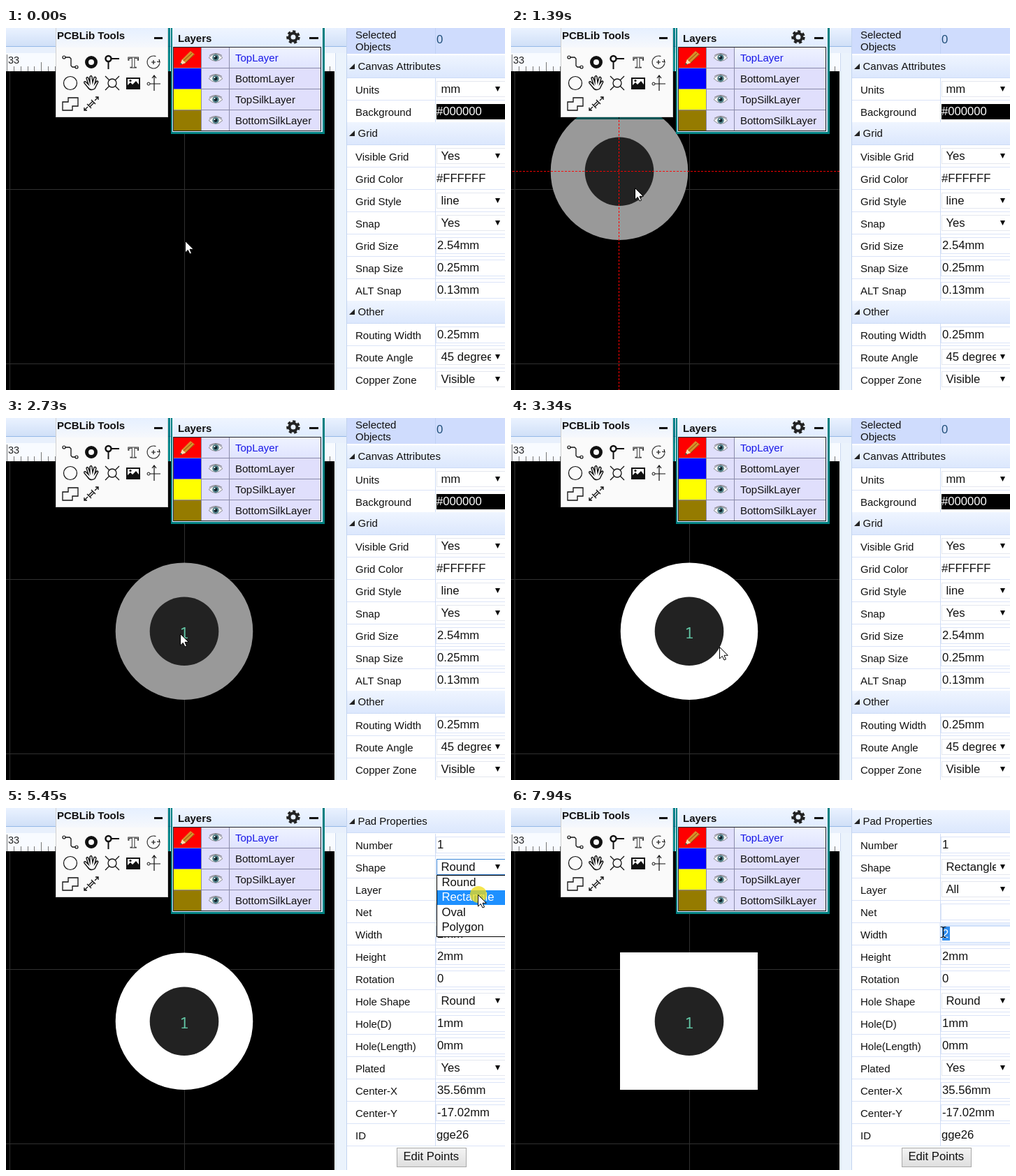
Animation, 714 px wide and 519 px high, one loop 8 s. Source, as an HTML page with a canvas:

```html
<!DOCTYPE html>
<html lang="en">
<head>
<meta charset="utf-8">
<title>Pad editing</title>
<style>
html, body { margin: 0; width: 100%; height: 100%; overflow: hidden; background: #000; }
canvas { display: block; }
</style>
</head>
<body>
<canvas id="stage" width="714" height="519"></canvas>
<script>
const ctx = document.getElementById('stage').getContext('2d');
const LOOP = 8000, TICK = 78.76;
const SANS = '"Liberation Sans", Arial, sans-serif';
const LABEL = `15px ${SANS}`, BOLD = `bold 15px ${SANS}`, VALUE = `16.67px ${SANS}`;

// Cursor track: time, x, y
const track = [
  [300, 257, 305], [380, 245, 282], [930, 118, 47], [1000, 118, 47], [1160, 140, 130],
  [1400, 177, 228], [1710, 253, 325], [1955, 253, 325], [2180, 251, 309], [2569, 251, 309],
  [2570, 238, 298], [2729, 238, 298], [2730, 250, 309], [2830, 250, 309], [3040, 303, 329],
  [3180, 303, 329], [3190, 299, 328], [3330, 299, 328], [3420, 291, 328], [3690, 291, 328],
  [4150, 668, 93], [4250, 668, 93], [4400, 674, 80], [4880, 674, 80], [5280, 676, 124],
  [7260, 676, 124], [7480, 634, 179], [7610, 634, 179], [7630, 633, 179], [7770, 633, 179],
  [7940, 618, 178]
];

const generalRows = [
  [55, 'Canvas Attributes', 'group'], [88, 'Units', 'select', 'mm'],
  [120, 'Background', 'dark', '#000000'], [151, 'Grid', 'group'],
  [184, 'Visible Grid', 'select', 'Yes'], [216, 'Grid Color', 'plain', '#FFFFFF'],
  [248, 'Grid Style', 'select', 'line'], [280, 'Snap', 'select', 'Yes'],
  [312, 'Grid Size', 'input', '2.54mm'], [344, 'Snap Size', 'input', '0.25mm'],
  [376, 'ALT Snap', 'input', '0.13mm'], [407, 'Other', 'group'],
  [440, 'Routing Width', 'input', '0.25mm'], [472, 'Route Angle', 'select', '45 degree'],
  [504, 'Copper Zone', 'select', 'Visible']
];

const padRows = (shape, width) => [
  ['Number', 'input', '1'], ['Shape', 'select', shape], ['Layer', 'select', 'All'],
  ['Net', 'input', ''], ['Width', 'input', width], ['Height', 'input', '2mm'],
  ['Rotation', 'input', '0'], ['Hole Shape', 'select', 'Round'], ['Hole(D)', 'input', '1mm'],
  ['Hole(Length)', 'input', '0mm'], ['Plated', 'select', 'Yes'],
  ['Center-X', 'input', '35.56mm'], ['Center-Y', 'input', '-17.02mm'], ['ID', 'plain', 'gge26']
].map((row, i) => [53 + 32 * i, ...row]);

function rect(x, y, w, h, color) {
  ctx.fillStyle = color;
  ctx.fillRect(x, y, w, h);
}
function frame(x, y, w, h, color) {
  ctx.strokeStyle = color;
  ctx.lineWidth = 1;
  ctx.strokeRect(x + .5, y + .5, w - 1, h - 1);
}
function text(str, x, y, font = LABEL, color = '#111') {
  ctx.font = font;
  ctx.fillStyle = color;
  ctx.fillText(str, x, y);
}
function disc(x, y, r, color) {
  ctx.fillStyle = color;
  ctx.beginPath();
  ctx.arc(x, y, r, 0, 7);
  ctx.fill();
}
function ring(x, y, r, width, color = '#111') {
  ctx.strokeStyle = color;
  ctx.lineWidth = width;
  ctx.beginPath();
  ctx.arc(x, y, r, 0, 7);
  ctx.stroke();
}
function line(d, width = 1.3, color = '#111') {
  ctx.strokeStyle = color;
  ctx.lineWidth = width;
  ctx.stroke(new Path2D(d));
}
function fill(d, color) {
  ctx.fillStyle = color;
  ctx.fill(new Path2D(d));
}
function shade(y, h, top, bottom) {
  const g = ctx.createLinearGradient(0, y, 0, y + h);
  g.addColorStop(0, top);
  g.addColorStop(1, bottom);
  return g;
}

function cursorAt(t) {
  const time = 300 + Math.floor((t - 300) / TICK + .2) * TICK;
  const i = track.findIndex(key => key[0] > time);
  if (i === 0) return track[0].slice(1);
  if (i < 0) return track[track.length - 1].slice(1);
  const [t0, x0, y0] = track[i - 1], [t1, x1, y1] = track[i];
  const p = (time - t0) / (t1 - t0);
  return [x0 + (x1 - x0) * p, y0 + (y1 - y0) * p].map(Math.round);
}
const snap = (v, origin) => Math.round((v - origin) / 25) * 25 + origin;

function drawBoard(t) {
  rect(0, 62, 470, 457, '#000');
  for (const x of [5, 255]) rect(x, 62, 1, 457, '#303030');
  for (const y of [231, 481]) rect(0, y, 470, 1, '#303030');
  if (t < 1080) return;

  // The pad follows the cursor one tick late, on the snap grid
  const placing = t < 2570;
  let x = 255, y = 306;
  if (placing) {
    const [cx, cy] = cursorAt(t - TICK);
    x = snap(cx, 5);
    y = snap(cy, 6);
  }
  const color = t < 2880 ? '#999' : '#fff';
  if (t < 6380) disc(x, y - .3, 98.3, color);
  else rect(156, 207, 197, 197, color);
  disc(x, y - .3, 49.3, '#222');

  if (placing) {
    ctx.setLineDash([3, 2]);
    line(`M${x - .5} 62V519M2 ${y - .5}H470`, 1, '#f00');
    ctx.setLineDash([]);
  } else {
    text('1', 248.5, 316, '22px "Noto Sans Mono", monospace', '#62c5a4');
  }
}

function drawChrome() {
  rect(0, 0, 487, 27, shade(0, 27, '#eaf2ff', '#cfdff7'));
  rect(0, 26, 487, 1, '#95b8e7');
  rect(0, 27, 487, 10, '#e8f0fc');
  rect(0, 36, 470, 26, '#f8fbff');
  for (let i = 0; i < 48; i++) {
    const h = i % 10 === 0 ? 24 : i % 5 === 0 ? 13 : 7;
    rect(Math.round(1 + i * 9.84), 62 - h, 1, h, '#777');
  }
  text('33', 3, 51, `14.5px ${SANS}`, '#222');
  rect(470, 36, 2, 483, '#fff');
  rect(472, 36, 15, 483, '#ebf3fc');
  rect(471, 36, 1, 483, '#c9d8f0');
}

function drawTools() {
  ctx.globalCompositeOperation = 'multiply';
  rect(75, 0, 160, 131, '#008c8c');
  ctx.globalCompositeOperation = 'source-over';
  rect(71, 0, 161, 128, '#d0d0d0');
  rect(72, 0, 159, 127, '#fafafa');
  rect(72, 0, 159, 28, shade(0, 28, '#e6f0ff', '#f6f8fc'));
  text('PCBLib Tools', 73, 16, BOLD);
  rect(212, 13, 12, 3, '#111');

  ring(83, 42, 2, 1.2); ring(101, 56, 2, 1.2);
  line('M85 42H91L93 44V54L95 56H99');
  ring(122, 49, 6.5, 5);
  ring(146.5, 44, 4, 2.5);
  line('M151 44H162M146.5 48V59', 2);
  ctx.lineWidth = 1;
  ctx.strokeStyle = '#333';
  ctx.font = 'bold 23px "Liberation Serif", serif';
  ctx.strokeText('T', 174.5, 57);
  ctx.lineWidth = 1.2;
  ctx.beginPath();
  ctx.arc(211, 49, 9, .15, 5.1);
  ctx.stroke();
  line('M208 49H214M211 46V52M219 45L220 49L216 48', 1.2);

  ring(92, 79, 9.5, 1.2);
  line('M117 85L112 79Q111 76 114 77L118 81L115 72Q116 69 118 72L120 78L120 70Q122 67 123 70L124 78L126 71Q128 69 129 72L127 80L130 76Q133 76 131 79L127 87Q121 91 117 85Z', 1.4);
  ring(152, 79, 6, 1.3);
  line('M142 69L148 75M162 69L156 75M142 89L148 83M162 89L156 83');
  rect(172, 71, 20, 17, '#111');
  rect(174, 73, 16, 13, '#fff');
  fill('M174 86V82L178 78L181 81L186 76L190 81V86Z', '#111');
  disc(178, 75.5, 1.6, '#111');
  line('M212 68V90M206 80H221M209 72L212 68L215 72', 1.2);
  ring(204, 80, 2, 1);

  line('M81 106H89V100H103V112H95V118H81Z');
  line('M112 118L117 113M127 104L132 99M112 114V118H116M128 99H132V103M116 109L122 115M122 103L128 109M118 111L124 105M120 113L126 107');
}

function drawEye(x, y) {
  const d = `M${x - 10} ${y}Q${x} ${y - 10} ${x + 10} ${y}Q${x} ${y + 10} ${x - 10} ${y}Z`;
  fill(d, '#f4f4f4');
  line(d, 1, '#8c8c94');
  disc(x, y, 4.7, '#4f7f88');
  disc(x, y, 2.4, '#102028');
  disc(x - 1.5, y - 1.5, 1, '#fff');
  line(`M${x - 9} ${y - 3}Q${x} ${y - 9} ${x + 9} ${y - 3}`, 1, '#777');
}

function drawLayers() {
  rect(236, 0, 220, 152, '#008080');
  rect(238, 0, 215, 149, '#e0ecff');
  rect(238, 0, 215, 27, shade(0, 27, '#eff5ff', '#e0ecff'));
  text('Layers', 246, 20, BOLD);
  ctx.setLineDash([4, 3.33]);
  ring(411, 13, 8, 3.5, '#222');
  ctx.setLineDash([]);
  ring(411, 13, 5.5, 4, '#222');
  rect(434, 13, 13, 3, '#111');

  rect(239, 27, 212, 121, '#222');
  rect(240, 28, 210, 119, '#e0dffc');
  rect(320, 28, 130, 29, shade(28, 29, '#eff3ff', '#e0e4ff'));
  const layers = [['TopLayer', '#f00'], ['BottomLayer', '#00f'],
    ['TopSilkLayer', '#ff0'], ['BottomSilkLayer', '#957b00']];
  layers.forEach(([name, color], i) => {
    const y = 28 + 30 * i;
    rect(240, y, 39, 29, color);
    if (i < 3) rect(240, y + 29, 210, 1, '#8b8baa');
    drawEye(300, y + 14.5);
    text(name, 328, y + 20, LABEL, i ? '#111' : '#1818e8');
  });
  for (const x of [279, 319]) rect(x, 28, 1, 119, '#8b8baa');
  fill('M249 53L252 45L264 33L270 38L257 50Z', '#d98f2b');
  fill('M249 53L252 45L257 50Z', '#f7ddb0');
  fill('M249 53L250 50L252 52Z', '#222');
  line('M254 47L266 36M257 50L269 38', 1, '#8a4b10');
}

function drawRow([c, label, kind, value], focused) {
  if (kind === 'group') {
    rect(488, c - 16, 226, 33, shade(c - 16, 33, '#eff5ff', '#dbe7fd'));
    rect(488, c + 16, 226, 1, '#cddcf7');
    fill(`M491 ${c + 4}H499V${c - 4}Z`, '#222');
    text(label, 503.5, c + 5);
    return;
  }
  rect(488, c + 15, 226, 1, '#dbe4f8');
  rect(614, c - 16, 1, 32, '#d0ddf5');
  text(label, 500, c + 6);
  if (kind === 'select') {
    frame(616, c - 12, 110, 23, focused ? '#3a86d8' : '#e4e7ef');
    ctx.save();
    ctx.beginPath();
    ctx.rect(617, c - 12, 77, 24);
    ctx.clip();
    text(value, 622.5, c + 5, VALUE);
    ctx.restore();
    fill(`M700 ${c - 4}H707L703.5 ${c + 3}Z`, '#000');
    return;
  }
  if (kind === 'dark') rect(616, c - 11, 98, 22, '#000');
  if (kind === 'input') {
    if (focused) {
      rect(613, c - 16, 101, 31, '#e6effd');
      rect(614, c - 13, 100, 25, '#cfe0fa');
      rect(616, c - 11, 98, 22, '#fff');
    } else {
      frame(615, c - 12, 110, 24, '#dbe4f8');
    }
  }
  text(value, kind === 'input' ? 617 : 616, c + 5, VALUE, kind === 'dark' ? '#fff' : '#111');
}

function drawDropdown(selected) {
  rect(616, 96, 98, 89, '#000');
  rect(617, 97, 97, 87, '#fff');
  ['Round', 'Rectangle', 'Oval', 'Polygon'].forEach((name, i) => {
    const on = i === selected, y = 97 + 21.4 * i;
    if (on) rect(617, Math.round(y), 97, 21, '#1e90ff');
    text(name, 623.5, Math.round(y + 15), VALUE, on ? '#fff' : '#111');
  });
}

function drawPanel(t) {
  rect(487, 0, 227, 519, '#fff');
  rect(487, 0, 1, 519, '#c3d4f0');
  if (t < 3380) {
    rect(488, 0, 226, 37, '#cfdcfd');
    rect(614, 0, 1, 37, '#c0d0f4');
    text('Selected', 500, 15);
    text('Objects', 500, 32);
    text('0', 616, 22, VALUE, '#1f4e79');
    generalRows.forEach(row => drawRow(row));
    return;
  }
  drawRow([19, 'Pad Properties', 'group']);
  const editing = t >= 7800, open = t >= 4530 && t < 6380;
  for (const row of padRows(t < 6380 ? 'Round' : 'Rectangle', editing ? '2' : '2mm')) {
    drawRow(row, row[1] === 'Shape' ? t >= 4450 && !editing : row[1] === 'Width' && editing);
  }
  rect(559, 487, 100, 28, shade(487, 28, '#f4f4f4', '#dedede'));
  frame(559, 487, 100, 28, '#aaa');
  text('Edit Points', 568.5, 505, VALUE);
  if (open) drawDropdown(t < 5120 ? 0 : 1);
  if (t >= 7930) {
    rect(617, 170, 11, 20, '#2f8cee');
    text('2', 617, 186, VALUE, '#fff');
  }
}

function drawCursor(t) {
  const [x, y] = cursorAt(t);
  if ((t >= 4450 && t < 4900) || (t >= 5450 && t < 7070)) {
    disc(x, y, 12, 'rgba(240, 220, 20, .75)');
  }
  ctx.save();
  ctx.translate(x, y);
  if (t > 7390) {
    line('M-3.5 -7.5H-1L.5 -6L2 -7.5H4.5M.5 -6V6M-3.5 7.5H-1L.5 6L2 7.5H4.5', 1.2);
  } else {
    const arrow = 'M-.5 .5V17L3.3 13.4L6 19L8.5 18L6 12.3H11.3Z';
    fill(arrow, '#fff');
    line(arrow, 1, '#000');
  }
  ctx.restore();
}

function render(now) {
  const t = now % LOOP;
  drawBoard(t);
  drawChrome();
  drawTools();
  drawLayers();
  drawPanel(t);
  drawCursor(t);
}

const start = performance.now();
function loop() {
  render(performance.now() - start);
  requestAnimationFrame(loop);
}
loop();
</script>
</body>
</html>
```
